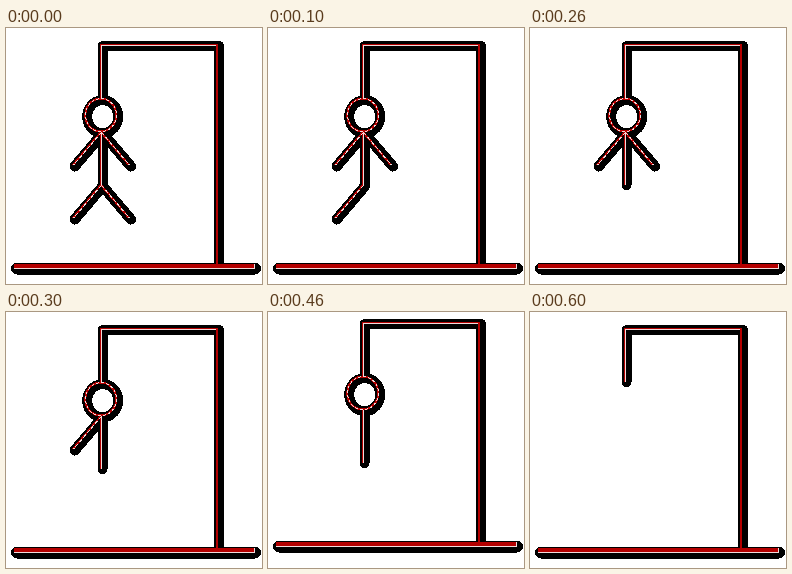
Write an HTML page that moves like this. It is 256 by 256 pixels and loops after 0.7 s.

```html
<!DOCTYPE html>
<html lang="en">
<head>
<meta charset="utf-8">
<title>Hangman</title>
<style>
  html, body { margin: 0; width: 100%; height: 100%; overflow: hidden; background: #fff; }
  svg { display: block; width: 100vw; height: 100vh; }
  path { fill: none; shape-rendering: crispEdges; }
  .back path { stroke-linecap: round; stroke-linejoin: round; }
</style>
</head>
<body>
<svg viewBox="0 0 256 256"><g id="scene"></g></svg>
<script>
const STEP = 100;
const LIFT = -6;
const RED = '#e00000';
const DARK_RED = '#b40000';
const PINK = '#f2dada';
const scene = document.getElementById('scene');

const ellipse = (cx, cy, rx, ry) =>
  `M${cx - rx} ${cy}a${rx} ${ry} 0 1 1 ${2 * rx} 0a${rx} ${ry} 0 1 1 ${-2 * rx} 0z`;

// Each part has a heavy backing, a fine red line and a hairline highlight on its lit edge.
const parts = {
  ground: {
    back: 'M11 240.6H249', line: 'M8 238H248', shine: 'M8 240.5H248.5V236',
    extra: 2, weight: 4
  },
  gallows: {
    back: 'M96.5 70V18.2H213.2V238', line: 'M95 70V17H211V238', shine: 'M95.5 70V17.5H210'
  },
  head: {
    back: ellipse(96.7, 88.7, 15.5, 16.5), line: ellipse(94.8, 87, 15.5, 16.5),
    shine: ellipse(95, 87.2, 15.5, 16.5), dash: '3 2'
  },
  body: { back: 'M96.5 105V157', line: 'M95 104V157', shine: 'M95.5 104V157' },
  leftArm: limb(95, 104, 67, 137),
  rightArm: limb(95, 104, 123, 137),
  leftLeg: limb(95, 157, 67, 190),
  rightLeg: limb(95, 157, 123, 190)
};

function limb(x1, y1, x2, y2) {
  const shifted = (dx, dy) => `M${x1 + dx} ${y1 + dy}L${x2 + dx} ${y2 + dy}`;
  return {
    back: shifted(1.8, 1.3), line: shifted(0, 0), shine: shifted(.5, .2),
    extra: .5, dash: '4 2'
  };
}

// Parts vanish from the end of the list, one per step.
const order = Object.keys(parts);
const poses = [
  { count: 8 },
  { count: 7 },
  { count: 6 },
  { count: 5 },
  { count: 4, lifted: true },
  { count: 3, lifted: true, glow: true },
  { count: 2 }
];

const stroke = (d, color, width, dash = 'none') =>
  `<path d="${d}" stroke="${color}" stroke-width="${width}" stroke-dasharray="${dash}"/>`;

function picture({ count, lifted, glow }) {
  const shown = order.slice(0, count).map(name => parts[name]);
  const layer = draw => shown.map(draw).join('');
  const backing = (color, width) =>
    layer(p => stroke(p.back, color, width + (p.extra || 0)));
  const back = glow
    ? backing('#000', 23.2) + stroke(parts.head.back, '#000', 24) + backing(PINK, 22.8)
    : backing('#000', 10);
  const lines = layer(p => stroke(p.line, glow ? RED : DARK_RED, p.weight || 2));
  const shine = glow ? '' : layer(p => stroke(p.shine, PINK, 1, p.dash));
  return `<g transform="translate(0 ${lifted ? LIFT : 0})">
    <g class="back">${back}</g>${lines}${shine}</g>`;
}

let current = -1;
function render(time) {
  const index = Math.floor(time / STEP) % poses.length;
  if (index === current) return;
  current = index;
  scene.innerHTML = picture(poses[index]);
}

const start = performance.now();
function tick() {
  render(performance.now() - start);
  requestAnimationFrame(tick);
}
tick();
</script>
</body>
</html>
```
